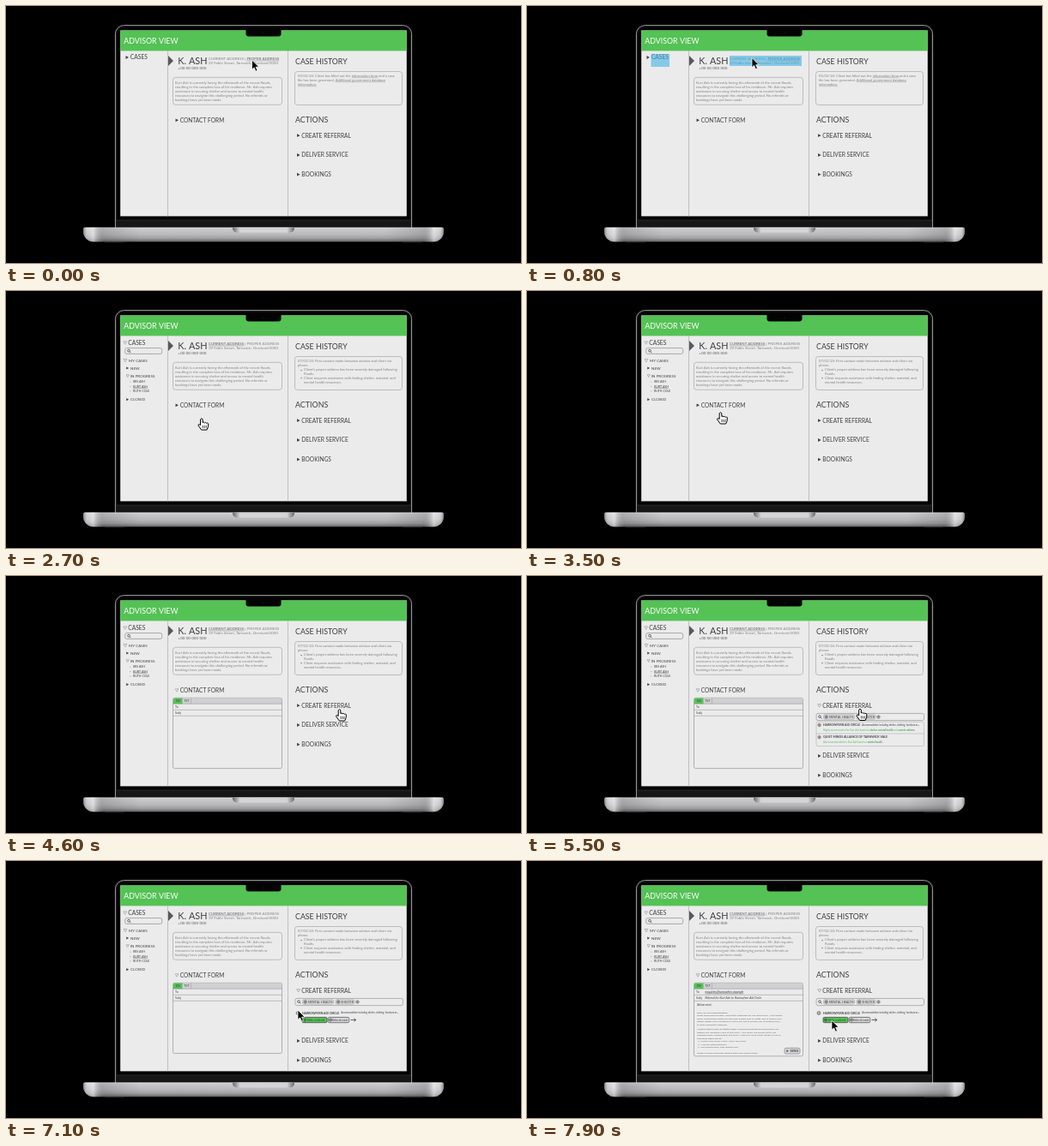
Recreate the animation shown at these times as an HTML page with a canvas. Size 600 by 300 pixels, loop 8000 ms.

```html
<!DOCTYPE html>
<html lang="en">
<head>
<meta charset="utf-8">
<title>Advisor view</title>
<style>
html, body { margin: 0; width: 100%; height: 100%; overflow: hidden; background: #000; }
canvas { display: block; width: 600px; height: 300px; }
</style>
</head>
<body>
<canvas id="stage" width="600" height="300"></canvas>
<script>
const ctx = document.getElementById('stage').getContext('2d');
const LOOP = 8000;
const INK = '#3f3f41', GREY = '#848486', RULE = '#a8a8aa', GREEN = '#54c254', PAGE = '#ebebec';

// Moments at which the interface switches state
const HINT_ON = 600, HINT_OFF = 1000, ADDRESS = 900, CASES = 1500, FORM = 3650,
  REFERRAL = 5400, CHOSEN = 7050, FILLED = 7500;

// time, x, y of the pointer tip
const PATH = [
  [0, 286.5, 63], [100, 286.5, 63], [700, 262, 60.5], [1000, 262, 60.5],
  [1450, 157, 62], [1800, 160, 62], [2050, 160, 62], [2650, 228, 149],
  [3000, 225.5, 141.5], [4150, 225.5, 141.5], [4600, 388.5, 155.5], [5000, 388, 155],
  [5500, 388, 155], [6100, 345, 187], [6300, 343.5, 183.5], [6450, 343.5, 183.5],
  [6750, 340, 174], [7100, 340, 174], [7400, 355, 186], [8000, 355, 186]
];
const HAND = [[2550, 3750], [4450, 5600]];

function line(x1, y1, x2, y2, color = RULE, w = 0.6) {
  ctx.strokeStyle = color;
  ctx.lineWidth = w;
  ctx.beginPath();
  ctx.moveTo(x1, y1);
  ctx.lineTo(x2, y2);
  ctx.stroke();
}

function box(x, y, w, h, r, fill, stroke, lw = 0.6) {
  ctx.beginPath();
  ctx.roundRect(x, y, w, h, r);
  if (fill) { ctx.fillStyle = fill; ctx.fill(); }
  if (stroke) { ctx.strokeStyle = stroke; ctx.lineWidth = lw; ctx.stroke(); }
}

function poly(points, fill, stroke, lw = 0.5) {
  ctx.beginPath();
  points.forEach(([x, y]) => ctx.lineTo(x, y));
  ctx.closePath();
  if (fill) { ctx.fillStyle = fill; ctx.fill(); }
  if (stroke) { ctx.strokeStyle = stroke; ctx.lineWidth = lw; ctx.stroke(); }
}

function ring(x, y, r, color = INK, lw = 0.6) {
  ctx.beginPath();
  ctx.arc(x, y, r, 0, 7);
  ctx.strokeStyle = color;
  ctx.lineWidth = lw;
  ctx.stroke();
}

// Small type is set ten times larger and scaled down for exact advances.
// y is the middle of the capitals; returns the right end of the text.
function text(s, x, y, size, { color = INK, style = '', under = false } = {}) {
  ctx.save();
  ctx.translate(x, y + size * 0.36);
  ctx.scale(0.1, 0.1);
  ctx.font = `${style} ${size * 10}px Lato, sans-serif`;
  ctx.fillStyle = color;
  ctx.fillText(s, 0, 0);
  const w = ctx.measureText(s).width / 10;
  ctx.restore();
  if (under) line(x, y + size * 0.5, x + w, y + size * 0.5, color, 0.4);
  return x + w;
}

function lines(rows, x, y, step, size, opts) {
  rows.forEach((s, i) => text(s, x, y + i * step, size, opts));
}

function toggle(x, y, open, r = 1.9) {
  if (open) poly([[x - r, y - r * 0.8], [x + r, y - r * 0.8], [x, y + r]], null, '#777', 0.45);
  else poly([[x - r * 0.8, y - r], [x + r, y], [x - r * 0.8, y + r]], INK);
}

function lens(x, y) {
  ring(x, y, 1.4, INK, 0.7);
  line(x + 1, y + 1, x + 2.4, y + 2.4, INK, 0.8);
}

function plus(x, y) {
  ring(x, y, 1.7, INK, 0.6);
  line(x - 0.9, y, x + 0.9, y, INK, 0.6);
  line(x, y - 0.9, x, y + 0.9, INK, 0.6);
}

function gradient(x1, y1, x2, y2, stops) {
  const g = ctx.createLinearGradient(x1, y1, x2, y2);
  stops.forEach(([p, c]) => g.addColorStop(p, c));
  return g;
}

function laptop() {
  box(127.4, 22.6, 345.2, 250, 10, '#030303', '#b4b4b8', 0.9);
  box(128.6, 23.8, 342.8, 240, 9, null, '#26262a', 0.8);
  ctx.fillStyle = '#161617';
  ctx.fillRect(128, 250, 344, 9);
  line(128, 250, 472, 250, '#3a3a3d', 0.6);

  box(90, 258.5, 420, 16.7, [2, 2, 12, 12], gradient(0, 258.5, 0, 275.2, [
    [0, '#efeff0'], [0.1, '#c9c9cc'], [0.5, '#b9b9bc'], [0.78, '#9c9c9f'], [1, '#626265']
  ]));
  const sheen = [[0, 'rgba(20,20,22,.4)'], [0.01, 'rgba(255,255,255,.2)'],
    [0.028, 'rgba(255,255,255,.5)'], [0.06, 'rgba(20,20,22,.14)'], [0.16, 'rgba(20,20,22,0)']];
  box(90, 258.5, 420, 16.7, [2, 2, 12, 12], gradient(90, 0, 510, 0,
    [...sheen, ...sheen.map(([p, c]) => [1 - p, c])]));
  box(264, 258.5, 72, 5.9, [0, 0, 5, 5], gradient(264, 0, 336, 0, [
    [0, '#68686b'], [0.12, '#d4d4d6'], [0.88, '#d4d4d6'], [1, '#68686b']
  ]));
  box(115, 275, 23, 1.2, 0.5, '#29292b');
  box(462, 275, 23, 1.2, 0.5, '#29292b');
}

function page() {
  ctx.fillStyle = PAGE;
  ctx.fillRect(133.2, 28.5, 333.6, 216.9);
  ctx.fillStyle = GREEN;
  ctx.fillRect(133.2, 28.5, 333.6, 23.9);
  box(279.5, 27, 41, 8.6, [0, 0, 3, 3], '#030303');
  ring(300, 31.5, 1, '#15151f');
  text('ADVISOR VIEW', 137.2, 41, 8.85, { color: '#fff' });
  line(188.5, 52.4, 188.5, 245.4, '#b4b4b6', 0.8);
  line(328.5, 52.4, 328.5, 245.4, '#b4b4b6', 0.8);
  poly([[189, 58], [195, 64], [189, 70]], '#58585a');
}

function caseList(open) {
  if (!open) {
    toggle(141, 60, false);
    text('CASES', 144.8, 60, 6.7);
    return;
  }
  toggle(138.7, 60.4, true);
  text('CASES', 142.2, 60.4, 6.7);
  box(138.7, 66.6, 43, 6.8, 2, null, '#7c7c7e', 0.6);
  lens(143, 69.7);
  toggle(139, 81, true);
  text('MY CASES', 143, 81, 4.5);
  toggle(141.5, 90, false, 1.6);
  text('NEW', 145, 90, 4.5);
  toggle(141.7, 99, true, 1.6);
  text('IN PROGRESS', 144.8, 99, 4.5);
  ['IRIS ASH', 'KURT ASH', 'RUTH COLE'].forEach((name, i) => {
    const y = 106.2 + i * 5.4;
    line(144, y, 145.5, y, GREY, 0.5);
    text(name, 148, y, 3.5, { under: i === 1 });
  });
  toggle(141.5, 126.7, false, 1.6);
  text('CLOSED', 145, 126.7, 4.5);
}

function client(current) {
  text('K. ASH', 200.3, 64, 10.9);
  text('+00 00 000 000', 200.5, 72.3, 4.6, { color: '#59595b' });
  const on = { color: '#68686a', under: true, style: '500' }, off = { color: GREY };
  let x = text('CURRENT ADDRESS', 236, 61.7, 4.4, current ? on : off);
  x = text(' | ', x, 61.7, 4.4, off);
  text('PROPER ADDRESS', x, 61.7, 4.4, current ? off : on);
  text((current ? '39' : '29') + ' Fable Street, Tarnwick, Orrelund 0000', 236, 66.7, 4.5, off);

  box(194.5, 83.3, 127, 32, 3, null, RULE, 0.7);
  lines([
    'Kurt Ash is currently facing the aftermath of the recent floods,',
    'resulting in the complete loss of his residence. Mr. Ash requires',
    'assistance in securing shelter and access to mental health',
    'resources to navigate this challenging period. No referrals or',
    'bookings have yet been made.'
  ], 197, 89.7, 4.95, 4.1, { color: GREY });
}

function history(updated) {
  const soft = { color: GREY }, link = { color: GREY, under: true };
  text('CASE HISTORY', 337, 64.5, 8.8);
  box(336.5, 76.5, 125, 39, 3, null, RULE, 0.7);
  if (!updated) {
    let x = text('05/02/24: Client has filled out the ', 340, 81.6, 4.1, soft);
    x = text('information form', x, 81.6, 4.1, link);
    text(' and a case', x, 81.6, 4.1, soft);
    x = text('file has been generated. ', 340, 86.6, 4.1, soft);
    text('Additional government database', x, 86.6, 4.1, link);
    text('information.', 340, 91.6, 4.1, link);
    return;
  }
  lines(['07/02/24: First contact made between advisor and client via', 'phone.'],
    340, 81.8, 4.95, 4.1, soft);
  lines([
    'Client’s proper address has been severely damaged following',
    'floods.',
    'Client requests assistance with finding shelter, material, and',
    'mental health resources.'
  ], 347, 91.7, 4.95, 4.1, soft);
  [91.9, 101.8].forEach(y => text('•', 342.7, y, 4.5, soft));
}

function letter() {
  const body = { color: '#5a5a5c' };
  text('enquiries@harrowfern.example', 207.5, 153, 3.5, { style: 'italic', under: true });
  text('Referral for Kurt Ash to Harrowfern Aid Circle', 207.5, 160, 3.5, { style: 'italic' });
  text('(Advisor name)', 198, 168, 2.7, { style: 'italic' });
  lines([
    'Dear Aid Circle Representative,',
    'Lorem ipsum dolor sit amet, consectetur adipiscing elit, sed mauris risus. Nulla congue',
    'mollis. Pellentesque vestibulum nulla quis feugiat. Duis ac mattis velit, in tempor nunc.',
    'Integer sagittis, risus in tristique ut, luctus elit. Sed at faucibus leo, ut pretium lorem',
    'ac quam elementum dignissim.'
  ], 198, 177, 3.5, 2.65, body);
  lines([
    'Vivamus efficitur odio, at sagittis magna. Aenean placerat ligula id dui posuere, sed',
    'dapibus orci commodo. Fusce at nulla nunc. Nulla facilisi, sed gravida tortor, sed',
    'commodo quam, condimentum quis purus. Mauris nec massa diam. Integer vel nisl in',
    'consequat adipiscing elit:',
    '  •  In diam nulla, iaculis a risus, cursus sed ornare',
    '  •  Nulla sed imperdiet ipsum',
    '  •  Sed molestie diam, vitae lobortis nunc'
  ], 198, 196.5, 3.5, 2.65, body);
  text('Integer ut massa malesuada, gravida ipsum quis, aliquet massa', 198, 224, 2.6, body);
  box(300, 218.3, 18, 6.8, 1.8, '#d6d6d8', '#777', 0.6);
  poly([[302, 220.2], [305, 221.7], [302, 223.2], [302.7, 221.7]], INK);
  text('SEND', 306.4, 221.7, 3.7, { style: 'bold' });
}

function contact(open, filled) {
  const rule = '#98989a';
  toggle(199.1, 133.3, open);
  text('CONTACT FORM', 202.7, 133.3, 6.6);
  if (!open) return;
  box(194.5, 142.3, 127, filled ? 85.5 : 82.3, 2, null, rule, 0.7);
  box(194.9, 142.6, 126.2, 6.6, [2, 2, 0, 0], '#d0d0d2');
  box(194.9, 142.6, 10.6, 6.6, [2, 0, 0, 0], GREEN);
  line(215.5, 142.5, 215.5, 149.2, rule, 0.5);
  [149.2, 156.3, 163.3].forEach(y => line(194.5, y, 321.5, y, rule, 0.6));
  text('EN', 198, 146, 3.4);
  text('TXT', 207.2, 146, 3.4);
  text('To', 197, 153, 3.5);
  text('Subj', 197, 160, 3.5);
  if (filled) letter();
}

function chip(s, x, w) {
  box(x, 161.8, w, 5.4, 1.4, '#dadadc', '#9a9a9c', 0.5);
  plus(x + 3.2, 164.5);
  text(s, x + 6.2, 164.5, 3.6);
}

function firstResult(y) {
  const x = text('HARROWFERN AID CIRCLE', 345, y, 3.4, { style: 'bold' });
  text('Accommodation including shelter, clothing, furniture as…', x + 2, y, 2.7);
}

function results() {
  const soft = { color: '#5dbb60' }, strong = { color: '#45a549', style: 'bold' };
  box(337, 170.2, 125.5, 28.3, 2, null, '#b0b0b2', 0.6);
  line(337, 184, 462.5, 184, '#b0b0b2', 0.6);
  plus(340.6, 174);
  firstResult(174);
  let x = text('Highly recommended for Kurt Ash based on ', 345, 179.6, 2.8, soft);
  x = text('shelter, mental health', x, 179.6, 2.8, strong);
  x = text(' and ', x, 179.6, 2.8, soft);
  text('current address.', x, 179.6, 2.8, strong);
  plus(340.6, 188.2);
  text('QUIET MINDS ALLIANCE OF TARNWICK VALE', 345, 188.2, 3.5, { style: 'bold' });
  x = text('Also recommended for Kurt Ash based on ', 345, 194, 2.8, soft);
  text('mental health.', x, 194, 2.8, strong);
}

function chosen() {
  ring(340, 177.5, 1.9, INK, 0.7);
  ctx.beginPath();
  [[339, 177.5], [339.8, 178.3], [341.1, 176.7]].forEach(p => ctx.lineTo(...p));
  ctx.stroke();
  firstResult(177.5);
  box(345, 182.4, 29, 6.3, 1.4, GREEN, '#3b3b3d', 0.7);
  plus(348, 185.5);
  text('Make a referral', 350.7, 185.5, 3.1);
  box(375.2, 182.4, 24.5, 6.3, 1.4, '#d8d8da', '#4b4b4d', 0.7);
  plus(378, 185.5);
  text('Referrals made', 380, 185.5, 2.8);
  line(401.5, 185.5, 407.5, 185.5, INK, 0.8);
  line(405.5, 183.6, 407.7, 185.5, INK, 0.8);
  line(405.5, 187.4, 407.7, 185.5, INK, 0.8);
}

function actions(open, picked) {
  text('ACTIONS', 337, 132.6, 8.9);
  const heads = [['CREATE REFERRAL', 151.2], ['DELIVER SERVICE', open ? 210 : 174],
    ['BOOKINGS', open ? 232.7 : 196.7]];
  heads.forEach(([s, y], i) => {
    toggle(340.6, y, open && i === 0);
    text(s, 344.2, y, 6.65);
  });
  if (!open) return;
  box(337, 160.4, 125.5, 8.2, 2, null, '#98989a', 0.7);
  lens(341, 164.1);
  chip('MENTAL HEALTH', 345.5, 36);
  chip('SHELTER', 384, 22);
  plus(409.5, 164.5);
  picked ? chosen() : results();
}

function hints(t) {
  if (t < HINT_ON || t >= HINT_OFF) return;
  ctx.globalAlpha = Math.min(1, (t - HINT_ON) / 100, (HINT_OFF - t) / 100);
  [[144.5, 56, 21.5, 15], [236, 58, 84, 12]].forEach(r => {
    ctx.fillStyle = 'rgba(62,178,228,.58)';
    ctx.fillRect(...r);
  });
  ctx.globalAlpha = 1;
}

function pointerAt(t) {
  const i = Math.max(1, PATH.findIndex(k => k[0] > t));
  const [t0, x0, y0] = PATH[i - 1], [t1, x1, y1] = PATH[i];
  const p = (t - t0) / (t1 - t0), e = p * p * (3 - 2 * p);
  return [x0 + (x1 - x0) * e, y0 + (y1 - y0) * e];
}

function arrow() {
  poly([[0, 0], [0, 11.2], [2.6, 8.9], [4.5, 13.2], [6.5, 12.3], [4.6, 8.2], [8.1, 8.1]],
    '#000', '#fff', 0.8);
}

function hand() {
  ctx.lineJoin = 'round';
  ctx.beginPath();
  ctx.moveTo(-1.3, 8);
  ctx.lineTo(-1.3, 1.2);
  ctx.quadraticCurveTo(0, -0.8, 1.3, 1.2);
  ctx.lineTo(1.3, 5);
  [3.6, 5.8, 7.9].forEach((x, i) => ctx.quadraticCurveTo(x - 1, 3.6 + i * 0.5, x, 5.4 + i * 0.5));
  ctx.lineTo(7.6, 10);
  ctx.lineTo(6.2, 13.5);
  ctx.lineTo(-0.2, 13.5);
  ctx.lineTo(-3.9, 8.4);
  ctx.quadraticCurveTo(-4, 6, -1.3, 8);
  ctx.closePath();
  ctx.fillStyle = '#fff';
  ctx.fill();
  ctx.strokeStyle = '#000';
  ctx.lineWidth = 1;
  ctx.stroke();
  [1.4, 3.4, 5.4].forEach(x => line(x, 8.3, x, 11.6, '#000', 0.7));
}

function draw(t) {
  ctx.fillStyle = '#000';
  ctx.fillRect(0, 0, 600, 300);
  laptop();
  page();
  caseList(t >= CASES);
  client(t >= ADDRESS);
  history(t >= CASES);
  contact(t >= FORM, t >= FILLED);
  actions(t >= REFERRAL, t >= CHOSEN);
  hints(t);
  ctx.save();
  ctx.translate(...pointerAt(t));
  HAND.some(([a, b]) => t >= a && t < b) ? hand() : arrow();
  ctx.restore();
}

const start = performance.now();
function tick() {
  draw((performance.now() - start) % LOOP);
  requestAnimationFrame(tick);
}
tick();
</script>
</body>
</html>
```
